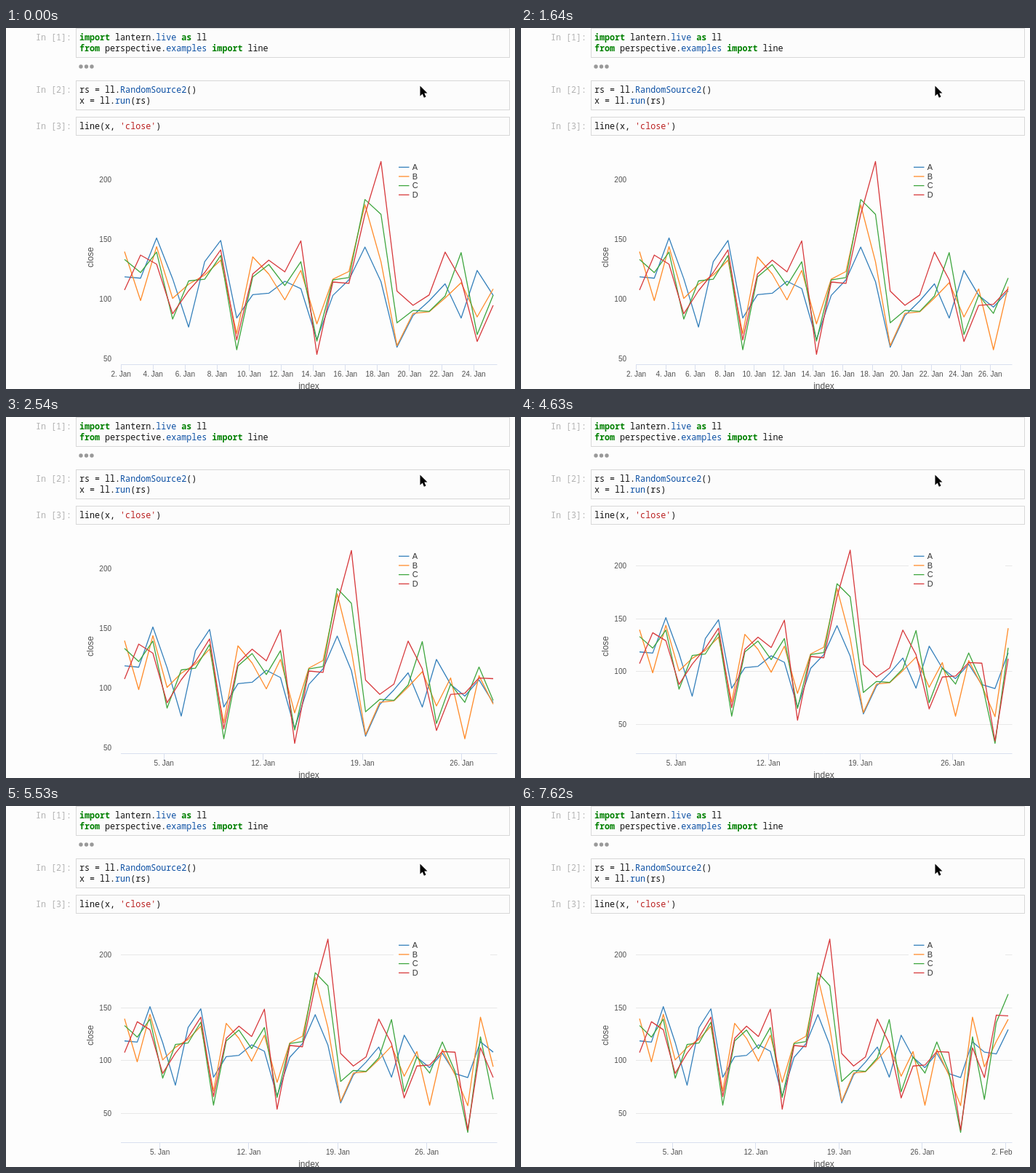
Write an HTML page with a canvas that moves like this. It is 700 px wide and 496 px high and loops after 8 s.

```html
<!DOCTYPE html>
<html lang="en">
<head>
<meta charset="utf-8">
<title>Live line chart</title>
<style>
  html, body { margin: 0; width: 100%; height: 100%; overflow: hidden; background: #fdfdfd; }
  #stage { position: relative; width: 700px; height: 496px; overflow: hidden; }
  canvas { position: absolute; left: 0; top: 0; width: 700px; height: 496px; }
  pre {
    position: absolute; margin: 0; color: #111;
    font: 11.7px/15px "Noto Sans Mono", "DejaVu Sans Mono", monospace;
  }
  .prompt { left: 41px; color: #b4b4b4; }
  .cell {
    left: 96px; width: 597px; box-sizing: border-box; padding: 4px;
    border: 1px solid #d8d8d8; background: #fcfcfc;
  }
  b { color: #008000; }
  i { color: #0b4fa3; font-style: normal; }
  s { color: #ba2121; text-decoration: none; }
</style>
</head>
<body>
<div id="stage">
  <pre class="prompt" style="top:5px">In [1]:</pre>
  <pre class="cell" style="top:0;height:41px"><b>import</b> lantern.<i>live</i> <b>as</b> ll
<b>from</b> perspective.<i>examples</i> <b>import</b> line</pre>
  <pre class="prompt" style="top:77px">In [2]:</pre>
  <pre class="cell" style="top:72px;height:41px">rs = ll.<i>RandomSource2</i>()
x = ll.<i>run</i>(rs)</pre>
  <pre class="prompt" style="top:127px">In [3]:</pre>
  <pre class="cell" style="top:122px;height:26px">line(x, <s>'close'</s>)</pre>
  <canvas id="chart"></canvas>
</div>
<script>
const LOOP = 8000;
const UPDATES = [600, 1640, 2540, 3590, 4630, 5530, 6580, 7620];
const FIRST_COUNT = 24;
const PLOT = { left: 158, right: 675.5, bottom: 462.5, x0: 163, x1: 670 };

const SERIES = [
  { name: 'A', color: '#3580bb', data: [
    118.5, 117.4, 151, 117, 76.5, 131.2, 148.9, 84.1, 103.6, 104.8, 114.8, 108.7, 66.1, 103, 116, 143.4,
    114.5, 59.7, 86.2, 98.4, 112.7, 84.1, 123.9, 103, 93.2, 106.8, 87.6, 83.8, 117.7, 107.9, 106.1, 129.3] },
  { name: 'B', color: '#ff8c2b', data: [
    139.6, 98.7, 143.8, 100.5, 112.4, 120, 132.5, 71, 135.2, 120.9, 99.3, 123.9, 79.2, 116.6, 123, 178.7,
    131.2, 61, 88, 89.3, 100.8, 113.6, 85, 108.4, 57.6, 110.3, 86.5, 57.1, 141, 94, 118, 139] },
  { name: 'C', color: '#3fa63f', data: [
    133.1, 122.1, 139.2, 83.2, 115.1, 116.6, 136.3, 57.6, 118.5, 128.8, 111.2, 131.2, 64.9, 116, 117.9, 183.2,
    170.8, 80.1, 90.5, 89.6, 102.5, 138.8, 70.3, 103.3, 88, 117.5, 89.5, 31.8, 122.4, 63, 136, 162.8] },
  { name: 'D', color: '#d7393c', data: [
    107.5, 136.7, 129.1, 87.7, 106.9, 122.1, 141, 65.7, 120.9, 132.5, 122.7, 148.6, 53.7, 114.2, 113, 170.8,
    215, 106.6, 94.7, 103.3, 139.2, 116, 64.5, 94.7, 95.6, 108.4, 107.8, 34, 112, 83.8, 143, 142.2] }
];

const canvas = document.getElementById('chart');
const ctx = canvas.getContext('2d');
const ratio = window.devicePixelRatio || 1;
canvas.width = 700 * ratio;
canvas.height = 496 * ratio;

function stroke(points, color, width) {
  ctx.beginPath();
  points.forEach(([x, y]) => ctx.lineTo(x, y));
  ctx.strokeStyle = color;
  ctx.lineWidth = width;
  ctx.lineJoin = 'round';
  ctx.stroke();
}

function label(text, x, y, { size = 10, align = 'center', color = '#505050' } = {}) {
  ctx.font = `${size}px "Liberation Sans", Arial, sans-serif`;
  ctx.textAlign = align;
  ctx.fillStyle = color;
  ctx.fillText(text, x, y);
}

function drawYAxis(yOf, grid) {
  for (const value of [50, 100, 150, 200]) {
    const y = yOf(value);
    const line = Math.floor(y) + 0.5;
    if (grid) {
      // The legend box interrupts the topmost line.
      const gap = value === 200 ? [533, 666] : [600, 600];
      stroke([[PLOT.left, line], [gap[0], line]], '#e8e8e8', 1);
      stroke([[gap[1], line], [PLOT.right, line]], '#e8e8e8', 1);
    }
    label(value, 145, y + 3.7, { align: 'right' });
  }
  ctx.save();
  ctx.translate(119.5, 315);
  ctx.rotate(-Math.PI / 2);
  label('close', 0, 0, { size: 12 });
  ctx.restore();
}

function drawXAxis(step, weekly) {
  stroke([[PLOT.left, PLOT.bottom], [PLOT.right, PLOT.bottom]], '#d9e0ef', 1);
  for (let day = weekly ? 5 : 2; ; day += weekly ? 7 : 2) {
    const x = PLOT.x0 + (day - 2.22) * step;
    if (x > PLOT.right) break;
    const tick = Math.floor(x) + 0.5;
    stroke([[tick, PLOT.bottom], [tick, PLOT.bottom + 9]], '#d9e0ef', 1);
    const text = day > 31 ? `${day - 31}. Feb` : `${day}. Jan`;
    ctx.font = '10px "Liberation Sans", Arial, sans-serif';
    const half = ctx.measureText(text).width / 2;
    const overflows = x + half > PLOT.right;
    if (overflows && !weekly) continue;
    label(text, overflows ? PLOT.right - half : x, 478.6);
  }
  label('index', 416.5, 496, { size: 12 });
}

function drawLegend() {
  SERIES.forEach(({ name, color }, i) => {
    const y = 191.3 + i * 12.65;
    stroke([[540, y], [554.5, y]], color, 1.3);
    label(name, 558.7, y + 3.8, { size: 11, align: 'left', color: '#333' });
  });
}

function drawDots() {
  ctx.fillStyle = '#999';
  for (const x of [103, 110.5, 118]) {
    ctx.beginPath();
    ctx.arc(x, 53, 2.7, 0, Math.PI * 2);
    ctx.fill();
  }
}

function drawPointer() {
  const shape = [[0, 0], [0, 14], [3.2, 11], [5.4, 16.2], [8, 15.1], [5.8, 10.1], [10, 10.1]];
  ctx.beginPath();
  shape.forEach(([x, y]) => ctx.lineTo(569.5 + x, 79.5 + y));
  ctx.closePath();
  ctx.strokeStyle = '#fff';
  ctx.lineWidth = 2;
  ctx.stroke();
  ctx.fillStyle = '#000';
  ctx.fill();
}

function draw(time) {
  const count = FIRST_COUNT + UPDATES.filter(t => t <= time).length;
  const step = (PLOT.x1 - PLOT.x0) / (count - 1);
  const wide = count >= 28;
  const [top, scale] = wide ? [204.7, 1.4487] : [208, 1.6433];
  const yOf = value => top + (200 - value) * scale;

  ctx.setTransform(ratio, 0, 0, ratio, 0, 0);
  ctx.clearRect(0, 0, 700, 496);
  drawDots();
  drawYAxis(yOf, wide);
  drawXAxis(step, count >= 27);
  for (const { data, color } of SERIES) {
    stroke(data.slice(0, count).map((v, i) => [PLOT.x0 + i * step, yOf(v)]), color, 1.3);
  }
  drawLegend();
  drawPointer();
}

const start = performance.now();
function tick() {
  draw((performance.now() - start) % LOOP);
  requestAnimationFrame(tick);
}
tick();
</script>
</body>
</html>
```
